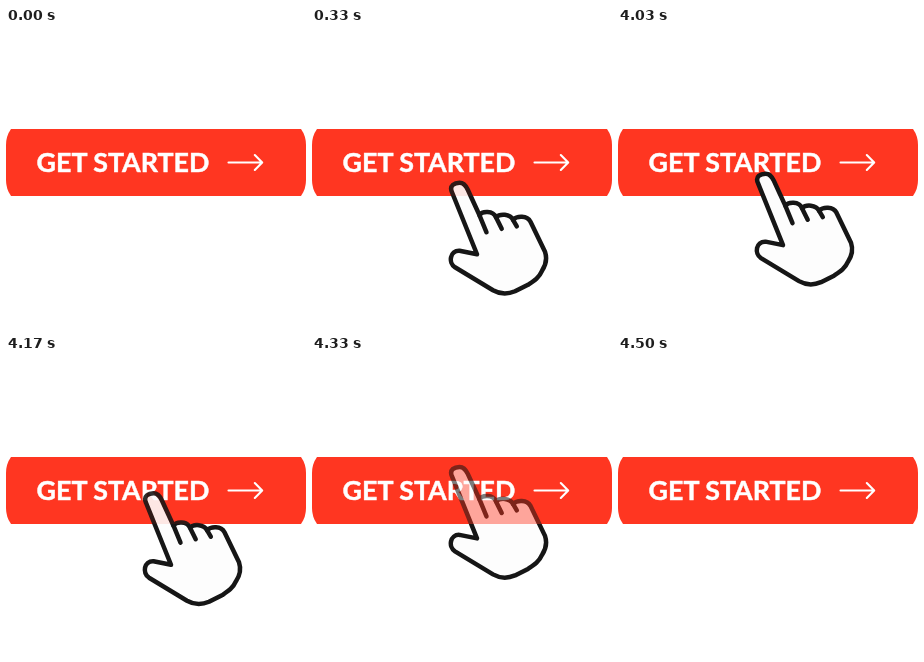
An HTML page that plays this animation: 300x300 px, repeating every 5010 ms.

```html
<!DOCTYPE html>
<html lang="en">
<head>
<meta charset="utf-8">
<title>Get started</title>
<style>
  html, body { margin: 0; width: 100%; height: 100%; overflow: hidden; background: #fff; }
  svg { display: block; width: 100%; height: 100%; }
  .label { font: 700 26.8px Lato, sans-serif; fill: #fff; stroke: #fff; stroke-width: 0.5; }
  .arrow { fill: none; stroke: #fff; stroke-width: 2.1; stroke-linecap: round; stroke-linejoin: round; }
  #hand { stroke: #161616; stroke-width: 4.5; stroke-linecap: round; stroke-linejoin: round; }
</style>
</head>
<body>
<svg viewBox="0 0 300 300">
  <defs>
    <path id="pill" d="M5 101H295Q300 108 300 117V152Q300 161 295 168H5Q0 161 0 152V117Q0 108 5 101Z"/>
    <clipPath id="inside"><use href="#pill"/></clipPath>
    <g id="hand">
      <path fill="#fdfdfd" d="M140 155.5C136.8 148.5 143 146 147.5 146C152 146 154 149 155.8 153L167.5 178.5
        C170 174 181 173.5 184 180.5C188 176.5 198 177 201 183C205 179 215 178.5 218.5 185
        L233 215C235 221 234 228 230 234C227 241 222 244 216 248L203 254.5
        C195 258 188 257.5 181 253.5L143 230.5C136 226 138 213.5 147.5 214L165 217.5Z"/>
      <path fill="none" d="M167.5 178.5L174.5 195.5M184 180.5L189.7 192M201 183L204.8 189.5"/>
    </g>
  </defs>

  <use id="solid" href="#hand"/>
  <use href="#pill" fill="#ff3621"/>
  <text class="label" x="30.6" y="144">GET STARTED</text>
  <path class="arrow" d="M222.5 134.5H256M248.8 127L256.2 134.5L248.8 142"/>
  <g clip-path="url(#inside)"><use id="faded" href="#hand"/></g>
</svg>
<script>
  const LOOP = 5010, FPS = 30, MOVE = 0.5, EXIT = 4, RISE = 79;
  const solid = document.getElementById('solid');
  const faded = document.getElementById('faded');
  const clamp = v => Math.min(1, Math.max(0, v));

  function draw(ms) {
    // 30 fps steps, snapped to hundredths of a second
    const t = Math.floor((Math.floor(ms / 10) * 10 + 3.4) * FPS / 1000) / FPS;
    const enter = (1 - clamp(t / MOVE)) ** 2;
    const leave = clamp((t - EXIT) / MOVE) ** 2;
    const alpha = 1 - enter - leave;
    const move = `translate(0 ${(RISE * (enter - leave)).toFixed(2)})`;

    solid.setAttribute('transform', move);
    faded.setAttribute('transform', move);
    // Off the button the hand is either solid or gone; over it, it fades
    solid.setAttribute('visibility', alpha >= 0.5 ? 'visible' : 'hidden');
    faded.setAttribute('opacity', clamp(alpha).toFixed(3));
  }

  let start;
  function tick(now) {
    start ??= now;
    draw((now - start) % LOOP);
    requestAnimationFrame(tick);
  }
  draw(0);
  requestAnimationFrame(tick);
</script>
</body>
</html>
```
